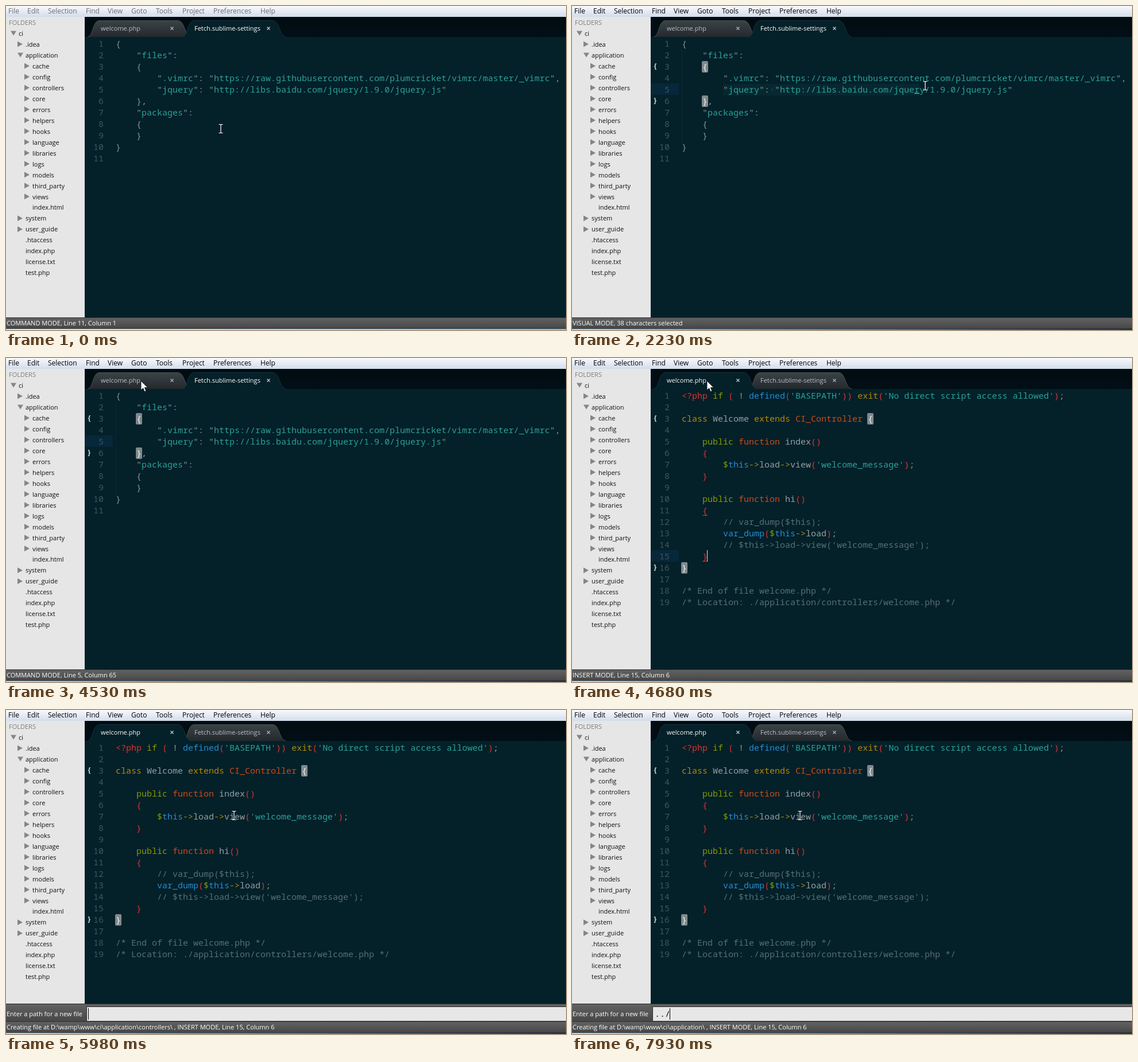
An HTML page that plays this animation: 975x565 px, repeating every 8000 ms.

```html
<!DOCTYPE html>
<html lang="en">
<head>
<meta charset="utf-8">
<title>Editor session</title>
<style>
html, body { margin: 0; width: 100%; height: 100%; overflow: hidden; background: #042029; }
svg { display: block; width: 100vw; height: 100vh; }
text { white-space: pre; font: 11px "Open Sans", "Noto Sans", sans-serif; }
.menu { font-size: 12px; }
.code { font: 15px "Noto Sans Mono", "DejaVu Sans Mono", monospace; }
</style>
</head>
<body>
<svg id="stage" viewBox="0 0 975 565">
  <defs>
    <linearGradient id="menuBg" x2="0" y2="1"><stop stop-color="#f7f9fd"/><stop offset="1" stop-color="#d3ddec"/></linearGradient>
    <linearGradient id="barBg" x2="0" y2="1"><stop stop-color="#636363"/><stop offset="1" stop-color="#464646"/></linearGradient>
    <linearGradient id="tabsBg" x2="0" y2="1"><stop stop-color="#020c11"/><stop offset="1" stop-color="#010f16"/></linearGradient>
    <linearGradient id="tabOff" x2="0" y2="1"><stop stop-color="#3b4347"/><stop offset="1" stop-color="#23292c"/></linearGradient>
    <linearGradient id="edgeOn"><stop stop-color="#a6dcf2"/><stop offset=".25" stop-color="#5aa5cc"/><stop offset="1" stop-color="#143a5a"/></linearGradient>
    <linearGradient id="edgeOff"><stop stop-color="#c3ecfa"/><stop offset="1" stop-color="#6fc4e6"/></linearGradient>
  </defs>
</svg>
<script>
const LOOP = 8000, COL = 9, ROW = 20, LEFT = 191;
const svg = document.getElementById('stage');

function el(tag, attrs = {}, parent = svg) {
  const node = document.createElementNS('http://www.w3.org/2000/svg', tag);
  for (const k in attrs) node.setAttribute(k, attrs[k]);
  return parent.appendChild(node);
}
const set = (node, attrs) => { for (const k in attrs) node.setAttribute(k, attrs[k]); };
const show = (node, on) => node.setAttribute('visibility', on ? 'visible' : 'hidden');
const rect = (x, y, width, height, fill, parent) => el('rect', { x, y, width, height, fill }, parent);
const group = () => el('g');
function label(x, y, str, fill, parent, cls = '') {
  const node = el('text', { x, y, fill, class: cls }, parent);
  node.textContent = str;
  return node;
}
const colX = c => LEFT + c * COL;
const baseY = line => 51 + line * ROW;

// Code colours; "~k" in a line switches to colour k
const INK = {
  n: '#839496', t: '#2aa198', r: '#dc322f', g: '#859900', b: '#268bd2',
  y: '#b58900', o: '#cb4b16', c: '#586e75', w: '#93a1a1'
};
function codeLine(line, src, parent) {
  const text = label(LEFT, baseY(line), '', INK.n, parent, 'code');
  for (const part of src.split('~').slice(1))
    el('tspan', { fill: INK[part[0]] }, text).textContent = part.slice(1);
}
// A bracket pair: grey boxes in the text, small marks in the gutter
function bracketPair(parent, a, b) {
  for (const [ch, line, col] of [['{', ...a], ['}', ...b]]) {
    set(rect(colX(col) - 1, line * ROW + 36, 11, 20, '#7f898c', parent), { rx: 2 });
    label(colX(col), baseY(line), ch, '#f4f6f6', parent, 'code');
    set(label(141, baseY(line) - 2, ch, '#c9d0d1', parent, 'code'), { style: 'font-size:13px;font-weight:bold' });
  }
}
function documentView(lines, currentLine) {
  const g = group();
  const current = rect(138, currentLine * ROW + 35, 48, 20, '#07273a', g);
  lines.forEach((src, i) => {
    const no = label(170, baseY(i + 1), i + 1, '#40565c', g, 'code');
    no.setAttribute('text-anchor', 'end');
  });
  return { g, current, fill: () => lines.forEach((src, i) => codeLine(i + 1, src, g)) };
}

const JSON_LINES = [
  '~n{',
  '~n    "~tfiles~n":',
  '~n    {',
  '~n        "~t.vimrc~n": "~thttps://raw.githubusercontent.com/plumcricket/vimrc/master/_vimrc~n",',
  '~n        "~tjquery~n": "~thttp://libs.baidu.com/jquery/1.9.0/jquery.js~n"',
  '~n    },',
  '~n    "~tpackages~n":',
  '~n    {',
  '~n    }',
  '~n}',
  ''
];
const PHP_LINES = [
  "~r<?php ~gif ~r( ~n! ~bdefined~r(~t'BASEPATH'~r)) ~yexit~r(~t'No direct script access allowed'~r)~n;",
  '',
  '~yclass ~wWelcome ~yextends ~oCI_Controller ~n{',
  '',
  '~g    public ~ofunction ~windex~r()',
  '~r    {',
  "~g        $~bthis~y->~wload~y->~wview~r(~t'welcome_message'~r)~n;",
  '~r    }',
  '',
  '~g    public ~ofunction ~whi~r()',
  '~r    {',
  '~c        // var_dump($this);',
  '~b        var_dump~r(~g$~bthis~y->~wload~r)~n;',
  "~c        // $this->load->view('welcome_message');",
  '~r    }',
  '~n}',
  '',
  '~c/* End of file welcome.php */',
  '~c/* Location: ./application/controllers/welcome.php */'
];

rect(0, 0, 975, 565, '#042029');

// Settings document
const settings = documentView(JSON_LINES, 5);
const selection = rect(colX(8), 136, 0, 20, '#082831', settings.g);
const pair = el('g', {}, settings.g);
rect(LEFT, 76, 1, 160, '#0c2a32', pair);
settings.fill();
const dot = rect(colX(17) + 4, 145, 1.5, 1.5, '#4d636a', settings.g);
const under = rect(0, 152, COL, 1, '#a9b7b7', settings.g);
const pairTop = el('g', {}, settings.g);
bracketPair(pairTop, [3, 4], [6, 4]);

// PHP document
const php = documentView(PHP_LINES, 15);
php.fill();
bracketPair(php.g, [3, 36], [16, 0]);
const focus = el('g', {}, php.g);
for (const line of [11, 15]) rect(colX(4), line * ROW + 54, COL, 1, INK.r, focus);
const caret = rect(235, 335, 1, 20, '#dfe6e6', php.g);

// Tabs
rect(137, 19, 838, 35, 'url(#tabsBg)');
const tabs = [
  { x: 142, textX: 165, closeX: 289, name: 'welcome.php' },
  { x: 307, textX: 328, closeX: 457, name: 'Fetch.sublime-settings' }
].map(({ x, textX, closeX, name }) => {
  const g = group();
  const shape = el('path', {
    d: `M${x} 54C${x + 11} 52 ${x + 8} 25.5 ${x + 21} 25.5H${x + 157}C${x + 170} 25.5 ${x + 168} 52 ${x + 180} 54`
  }, g);
  const text = label(textX, 43, name, '#fff', g);
  const cross = el('path', { d: `M${closeX - 2.5} 36.5l5 5m0-5l-5 5`, 'stroke-width': 1.5 }, g);
  return { g, shape, text, cross };
});
function styleTab({ g, shape, text, cross }, active) {
  set(shape, { fill: active ? '#042029' : 'url(#tabOff)', stroke: active ? '#18343d' : '#485156' });
  set(text, { fill: active ? '#fff' : '#b9bfc1' });
  set(cross, { stroke: active ? '#b4bdbf' : '#a3aaac' });
}

// Sidebar: depth digit, then + open, > closed, space for a file
rect(0, 19, 137, 525, '#e6e6e6');
label(5, 33, 'FOLDERS', '#7d7d7d');
const TREE = ('0+ci|1>.idea|1+application|2>cache|2>config|2>controllers|2>core|2>errors|2>helpers|2>hooks|' +
  '2>language|2>libraries|2>logs|2>models|2>third_party|2>views|2 index.html|1>system|1>user_guide|' +
  '1 .htaccess|1 index.php|1 license.txt|1 test.php').split('|');
TREE.forEach((row, i) => {
  const x = 8 + 12 * row[0], y = 47.5 + 18.98 * i;
  if (row[1] === '+') el('path', { d: `M${x} ${y - 4}h10l-5 8z`, fill: '#858585' });
  if (row[1] === '>') el('path', { d: `M${x} ${y - 5}v10l9-5z`, fill: '#858585' });
  label(x + 14, Math.round(y + 4.3), row.slice(2), '#111');
});

// Menu
rect(0, 0, 975, 19, 'url(#menuBg)');
const menu = group();
[['File', 4], ['Edit', 37], ['Selection', 73], ['Find', 139], ['View', 177], ['Goto', 218],
  ['Tools', 261], ['Project', 307], ['Preferences', 361], ['Help', 443]]
  .forEach(([name, x]) => label(x, 13, name, 'inherit', menu, 'menu').removeAttribute('fill'));

// Input panel
const panel = group();
rect(0, 512, 975, 32, 'url(#barBg)', panel);
rect(0, 512, 975, 1, '#2c2c2c', panel);
label(1, 534, 'Enter a path for a new file', '#fff', panel);
rect(140, 517, 835, 25, '#2f2f2f', panel);
rect(141, 518, 834, 24, '#e7e7e7', panel);
const typed = label(144, 535, '', '#111', panel, 'code');
const panelCaret = rect(143, 520, 1, 20, '#000', panel);

// Status bar and window edge
rect(0, 543, 975, 20, 'url(#barBg)');
rect(0, 543, 975, 1, '#333');
const status = label(1, 557, '', '#fff');
const edge = rect(0, 562, 975, 3, '');
rect(0, 562, 975, 1, '#2a3338');

// Pointers
const beam = el('path', {
  d: 'M-3.5-7.5h2.5l1 1 1-1h2.5M.0-6.5v13M-3.5 7.5h2.5l1-1 1 1h2.5', fill: 'none', stroke: '#fff', 'stroke-width': 1.2
});
const arrow = el('path', { d: 'M0 0v16l3.7-3.5 2.5 6 2.6-1.1-2.5-5.8h5.2z', fill: '#fff', stroke: '#111', 'stroke-width': .8 });

// Pointer legs: start, end, number of hops, target x and y
const START = [374, 214];
const LEGS = [
  [500, 1220, 6, 267, 147],
  [1730, 2230, 5, 615, 139],
  [2355, 2480, 2, 700, 142],
  [2630, 3330, 5, 790, 144],
  [3610, 3610, 1, 784, 144],
  [3740, 4530, 7, 235, 40],
  [4820, 5100, 3, 397, 184]
];
function pointer(t) {
  let [x, y] = START;
  for (const [t0, t1, hops, tx, ty] of LEGS) {
    if (t < t0) break;
    const gap = (t1 - t0) / (hops - 1) || 1;
    const k = Math.min(hops, Math.floor((t - t0) / gap + 1e-6) + 1) / hops;
    x += (tx - x) * k;
    y += (ty - y) * k;
  }
  return [Math.round(x), Math.round(y)];
}
// Value of the last [time, value] pair that has begun
const at = (t, pairs) => pairs.reduce((v, [t0, next]) => t >= t0 ? next : v, pairs[0][1]);

function render(t) {
  const active = t >= 1500, inPhp = t >= 4680, asking = t >= 5980;
  const [x, y] = pointer(t);
  const visual = t >= 1730 && t < 3740;
  const count = visual ? Math.max(1, Math.min(56, Math.floor((x - 200) / COL) - 8)) : 0;

  set(menu, { fill: active ? '#000' : '#6e6e6e' });
  set(edge, { fill: active ? 'url(#edgeOn)' : 'url(#edgeOff)' });

  set(settings.g, { display: inPhp ? 'none' : 'inline' });
  set(php.g, { display: inPhp ? 'inline' : 'none' });
  for (const node of [settings.current, pair, pairTop]) show(node, active);
  set(selection, { width: count * COL });
  show(dot, count > 9);
  show(under, visual);
  set(under, { x: colX(7 + count) });

  show(focus, !asking);
  show(php.current, !asking);
  set(caret, { opacity: asking ? 0 : at(t, [[4680, 1], [4960, .5], [5100, 0], [5680, 1]]) });

  styleTab(tabs[0], inPhp);
  styleTab(tabs[1], !inPhp);
  const top = tabs[inPhp ? 0 : 1].g, other = tabs[inPhp ? 1 : 0].g;
  if (other.nextSibling !== top) top.before(other);

  set(panel, { display: asking ? 'inline' : 'none' });
  const path = at(t, [[0, ''], [6490, '.'], [6770, '..'], [6920, '../']]);
  typed.textContent = path;
  set(panelCaret, {
    x: 143 + COL * path.length,
    opacity: at(t, [[0, 1], [6220, .5], [6360, 0], [6490, 1], [7230, .6], [7365, .3], [7500, 0], [7930, 1]])
  });

  const folder = 'D:\\wamp\\www\\ci\\application\\' + (t < 6920 ? 'controllers\\' : '');
  status.textContent =
    asking ? `Creating file at ${folder} , INSERT MODE, Line 15, Column 6` :
    inPhp ? 'INSERT MODE, Line 15, Column 6' :
    visual ? `VISUAL MODE, ${count} characters selected` :
    'COMMAND MODE, Line ' + at(t, [[0, '11, Column 1'], [1500, '5, Column 9'], [3740, '5, Column 65']]);

  const overText = y > 54;
  show(beam, overText);
  show(arrow, !overText);
  set(overText ? beam : arrow, { transform: `translate(${x} ${y})` });
}

function tick() {
  render(performance.now() % LOOP);
  requestAnimationFrame(tick);
}
tick();
</script>
</body>
</html>
```
